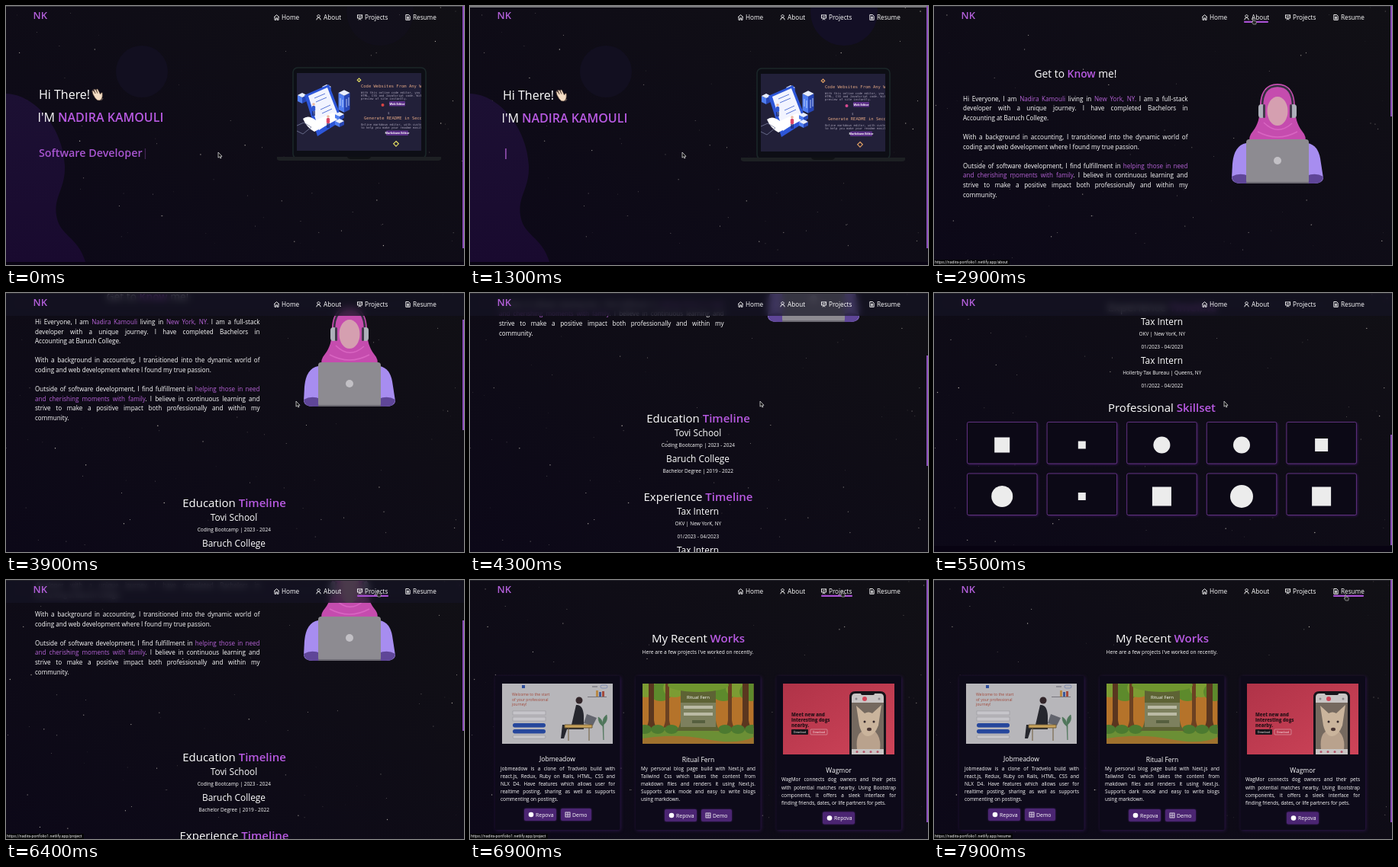
Animation of 600 by 340 pixels, one loop 8000 ms. Source, as an HTML page with a canvas:

```html
<!DOCTYPE html>
<html lang="en">
<head>
<meta charset="utf-8">
<title>Portfolio</title>
<style>
html, body { margin: 0; width: 600px; height: 340px; overflow: hidden; background: #0c0a14; }
#stage { position: relative; width: 600px; height: 340px; overflow: hidden; color: #fff;
  font-family: "Open Sans", "Noto Sans", sans-serif; font-weight: 500;
  background: linear-gradient(to bottom left, #111015, #0c0818); }
#stage > *, .page > * { position: absolute; left: 0; top: 0; }
svg { overflow: visible; display: block; }
.page { width: 600px; height: 340px; }
.row { position: absolute; white-space: nowrap; }
.full { text-align-last: justify; }
b { color: #b562d6; font-weight: inherit; }
.strong { fill: #b85ae2; font-weight: 600; }
#typed { left: 43px; top: 183px; font-size: 14.3px; line-height: 20px; font-weight: 600;
  color: #a855d0; white-space: pre; }
#caret { color: #b562d6; }
#bar { width: 600px; height: 30px; background: rgba(21, 20, 36, .72); backdrop-filter: blur(5px); }
#thumb { left: 598px !important; width: 2px; background: #8c4fbd; }
#link { top: 333px !important; height: 7px; padding: 0 2px 0 1px; background: #050507; color: #eee;
  font: 5.2px/7px Roboto, sans-serif; white-space: nowrap; }
#edge { width: 600px; }
.foot { width: 600px; background: #080312; }
</style>
</head>
<body>
<div id="stage">
  <canvas id="sky" width="600" height="340"></canvas>
  <div id="home" class="page"></div>
  <div id="about" class="page"></div>
  <div id="works" class="page"></div>
  <div id="bar"></div>
  <svg id="nav" width="600" height="30"></svg>
  <div id="edge"></div>
  <div id="thumb"></div>
  <div id="link"></div>
  <svg id="mouse" width="12" height="14"></svg>
</div>
<script>
const LOOP = 8000, STEP = 100;
const $ = id => document.getElementById(id);

// ---------- drawing helpers ----------
const svg = (body, h = 340) => `<svg width="600" height="${h}">${body}</svg>`;
const text = (x, y, size, str, attrs = 'fill="#fff"') =>
  `<text x="${x}" y="${y}" font-size="${size}" ${attrs}>${str}</text>`;
const mid = (x, y, size, str, attrs = '') =>
  text(x, y, size, str, `fill="#fff" text-anchor="middle" ${attrs}`);
const rect = (x, y, w, h, fill, attrs = '') =>
  `<rect x="${x}" y="${y}" width="${w}" height="${h}" fill="${fill}" ${attrs}/>`;
const disc = (x, y, r, fill) => `<circle cx="${x}" cy="${y}" r="${r}" fill="${fill}"/>`;
const oval = (x, y, rx, ry, fill) => `<ellipse cx="${x}" cy="${y}" rx="${rx}" ry="${ry}" fill="${fill}"/>`;
const poly = (pts, fill, attrs = '') => `<polygon points="${pts}" fill="${fill}" ${attrs}/>`;
const path = (d, fill, attrs = '') => `<path d="${d}" fill="${fill}" ${attrs}/>`;
const accent = str => `<tspan class="strong">${str}</tspan>`;

// Justified rows; y is the middle of the first row.
const rows = (x, y, w, size, gap, lines) => lines.map((line, i) =>
  `<div class="row ${i < lines.length - 1 ? 'full' : ''}" style="left:${x}px;top:${y + i * gap - gap / 2}px;` +
  `width:${w}px;font-size:${size}px;line-height:${gap}px">${line}</div>`).join('');

// Isometric block: x, y is the centre of the top face.
const block = (x, y, w, h) => {
  const d = w / 2;
  return poly(`${x - w},${y} ${x},${y + d} ${x},${y + d + h} ${x - w},${y + h}`, '#4f7df0') +
    poly(`${x + w},${y} ${x},${y + d} ${x},${y + d + h} ${x + w},${y + h}`, '#2746b5') +
    poly(`${x - w},${y} ${x},${y - d} ${x + w},${y} ${x},${y + d}`, '#e8eeff');
};
const person = (x, y, shirt) => disc(x, y - 7, 1.8, '#e8b8a0') +
  rect(x - 2.2, y - 5, 4.4, 7, shirt, 'rx="1.5"') + rect(x - 1.7, y + 2, 1.4, 6, '#1c2a70') + rect(x + .4, y + 2, 1.4, 6, '#1c2a70');

// ---------- home ----------
function laptop() {
  const mono = 'fill="#e0a583" font-family="DejaVu Sans Mono, monospace"';
  const tiny = 'fill="#a9a3b8" font-family="DejaVu Sans Mono, monospace"';
  const tag = (x, y, w, label) => rect(x, y, w, 6.5, '#5b2f87', 'rx="1"') +
    mid(x + w / 2, y + 4.6, 3.7, label, 'font-weight="700"');
  const scene =
    block(420, 106, 6, 4) + block(388, 117, 6, 8) +
    poly('391,117 423,103 441,150 408,171', '#2d56d8') +
    poly('396,118 421,107 436,146 410,163', '#f2f4ff') +
    path('M389 148Q396 142 406 150L428 140Q436 142 434 149L404 165Q394 160 389 148Z', '#fff') +
    path('M404 121l14-6M406 126l14-6M412 136l13-6M414 141l13-6', 'none', 'stroke="#5a77d8"') +
    block(443, 114, 7.5, 22) + path('M438 121v10M441 123v10M446 122v11M449 120v11', 'none', 'stroke="#dbe5ff" stroke-width=".8"') +
    block(437, 142, 6, 5) + block(437, 151, 6, 5) +
    person(403, 136, '#3157cf') + person(422, 152, '#d94668') +
    path('M379 158l11-5 10 6-11 9-10-5z', 'none', 'stroke="#777b9b" stroke-width=".8"');
  return rect(376, 81, 174, 119, '#0d0e15', 'rx="6" stroke="#1b2729" stroke-width="1.6"') +
    rect(381, 88, 163, 102, '#222039') +
    `<g clip-path="url(#screen)">${scene}` +
    text(465, 107, 5.5, 'Code Websites From Any Where', mono) +
    ['With this online code editor, you can', 'HTML, CSS and JavaScript code. With', 'preview of site instantly.']
      .map((s, i) => text(465, 115 + i * 4.2, 3.9, s, tiny)).join('') +
    tag(502, 125, 21, 'Web Editor') + text(500, 142, 4, '$', tiny) +
    text(469, 149, 5.5, 'Generate README in Seconds', mono) +
    ['Online markdown editor, with custom', 'to help you make your readme easily.']
      .map((s, i) => text(465, 157 + i * 4.2, 3.9, s, tiny)).join('') +
    tag(498, 163.5, 29, 'Markdown Editor') +
    `<g id="gems" fill="none" stroke-width="1.2"><path d="M462.5 95l2.2 2.2-2.2 2.2-2.2-2.2z"/><path d="M511 177.5l3.3 3.3-3.3 3.3-3.3-3.3z"/></g>` +
    `<circle id="dot" cx="493.5" cy="130" r="2"/></g>` +
    path('M355 198H570V201Q569 203 565 203H360Q356 203 355 201Z', '#1d2023') +
    path('M447 198h31q-1 3-5 3h-21q-4 0-5-3z', '#101215');
}
const hand = `<g id="wave" fill="#f4ddc4" stroke="#5d4637" stroke-width=".6">
  <path d="M114 116l-1-4q1-1.5 2.2 0l2 3-2-5q1-1.5 2.3 0l2.5 4.5-1.6-4.8q1.2-1.3 2.2 .2l3 6q.8-3 2.6-2 .5 6-1.2 8.5-2.5 2.5-5.5 1-3-2-5.5-7.4z"/>
  <path d="M115 109.5q-2 1-2.2 3M127 121q-.5 2-2.5 2.8" fill="none" stroke="#a88f80"/></g>`;
$('home').innerHTML = `<div class="foot" style="top:336px;height:4px"></div>` + svg(`
  <defs>
    <clipPath id="screen"><rect x="381" y="88" width="163" height="102"/></clipPath>
    <linearGradient id="blob" x1="0" y1="0" x2="0" y2="1"><stop offset="0" stop-color="#1c1033"/><stop offset="1" stop-color="#190a2f"/></linearGradient>
  </defs>
  ${path('M0 115C38 116 75 160 77 210C78 240 62 250 66 275C70 302 94 302 104 336H0Z', 'url(#blob)')}
  ${disc(178, 86, 34, '#120f20')}
  <circle id="moon" cx="490" cy="8" r="44" fill="#15102a"/>
  <g id="hero">
    ${text(43, 122, 16, 'Hi There!')}${hand}
    ${text(41.5, 152, 16, 'I\'M')}
    ${text(68, 152, 16, 'NADIRA KAMOULI', 'class="strong"')}
    ${laptop()}
  </g>`) + `<div id="typed"><span id="word"></span><span id="caret">|</span></div>`;

// ---------- about ----------
const woman = `
  ${path('M409 180Q393 183 391 207L390 226Q391 233 402 233H498Q509 233 510 226L506 200Q503 183 490 180Z', '#a78df0')}
  ${path('M390 224Q400 218 412 223V233H402Q391 233 390 224ZM510 224Q500 218 488 223V233H498Q509 233 510 224Z', '#5f4698')}
  ${path('M450 102C435 102 427 113 427 132C427 147 424 156 418 164Q411 172 414 180H486Q489 172 482 164C476 156 473 147 473 132C473 113 465 102 450 102Z', '#c54cae')}
  ${path('M434 110q16-9 32 0M424 165q26 14 52 0M432 153q18 18 37 1', 'none', 'stroke="#d965c2" stroke-width="1.5"')}
  ${oval(450, 138, 13.5, 19, '#d59fb0')}
  ${path('M430 132Q430 105 450 105T470 132', 'none', 'stroke="#353040" stroke-width="2.6"')}
  ${rect(425, 129, 8, 18, '#aeb0ba', 'rx="4"')}${rect(467, 129, 8, 18, '#aeb0ba', 'rx="4"')}
  ${rect(431, 129, 3, 18, '#40394a', 'rx="1.5"')}${rect(466, 129, 3, 18, '#40394a', 'rx="1.5"')}
  ${rect(409, 175, 82, 58, '#8d8b91', 'rx="4"')}${rect(409, 231, 82, 2, '#6c6a72', 'rx="1"')}
  ${disc(450, 203, 5, '#c2c0c5')}`;
const entry = (y, title, ...notes) => mid(298.5, y + 4, 11.9, title) +
  notes.map((s, i) => mid(298.8, y + 17.7 + i * 17, 6.5, s)).join('');
// s = square, c = circle, followed by its size
const marks = ['s20', 's10', 'c11', 'c11', 's17', 'c14', 's10', 's25', 'c15', 's25'];
const skills = marks.map((m, i) => {
  const x = 43.5 + (i % 5) * 104.6, y = 613.5 + Math.floor(i / 5) * 67.5, n = +m.slice(1);
  const cx = x + 45.7, cy = y + 30;
  return rect(x, y, 91.5, 54.5, '#0c0916', 'rx="2" stroke="#743d97" stroke-width=".8" style="filter:drop-shadow(1px 1px 1.5px #331650)"') +
    (m[0] === 'c' ? disc(cx, cy, n, '#ececec') : rect(cx - n / 2, cy - n / 2, n, n, '#ececec'));
}).join('');
$('about').innerHTML = `<div class="foot" style="top:776px;height:8px"></div>` + svg(`
  ${mid(185.5, 93.5, 13.8, `Get to ${accent('Know')} me!`)}
  ${woman}
  ${mid(299, 365, 15, `Education ${accent('Timeline')}`)}
  ${entry(379, 'Tovi School', 'Coding Bootcamp | 2023 - 2024')}
  ${entry(413, 'Baruch College', 'Bachelor Degree | 2019 - 2022')}
  ${mid(299, 468, 15, `Experience ${accent('Timeline')}`)}
  ${entry(482, 'Tax Intern', 'OKV | New YorK, NY', '01/2023 - 04/2023')}
  ${entry(533, 'Tax Intern', 'Hollerby Tax Bureau | Queens, NY', '01/2022 - 04/2022')}
  ${mid(298.5, 600, 15, `Professional ${accent('Skillset')}`)}
  ${skills}`, 790) +
  rows(38, 122, 294.5, 8.1, 12.6, ['Hi Everyone, I am <b>Nadira Kamouli</b> living in <b>New York, NY.</b> I am a full-stack',
    'developer with a unique journey. I have completed Bachelors in', 'Accounting at Baruch College.']) +
  rows(38, 172.3, 294.5, 8.1, 12.6, ['With a background in accounting, I transitioned into the dynamic world of',
    'coding and web development where I found my true passion.']) +
  rows(38, 210, 294.5, 8.1, 12.6, ['Outside of software development, I find fulfillment in <b>helping those in need</b>',
    '<b>and cherishing moments with family</b>. I believe in continuous learning and',
    'strive to make a positive impact both professionally and within my', 'community.']);

// ---------- works ----------
const reader = rect(120, 153, 25, 1, '#77757c') + rect(123, 146, 3, 7, '#a34a3c') + rect(127, 147, 3, 6, '#3d5899') + rect(131, 145, 3, 8, '#b88947') +
  path('M150 178Q151 163 160 164L166 190H178L180 208H176L172 196H150Z', '#25262d') + disc(156, 158, 4.5, '#33262a') +
  poly('133,181 146,176 150,188 138,191', '#62646d') + path('M139 190h36v4h-36zM143 194v17M170 194v17', '#c8a35b', 'stroke="#6e5b38"') +
  path('M124 210v-20q-6-5-4-13 6 4 5 13 1-8 6-10 0 8-6 12z', '#4f765b', 'stroke="#4f765b" stroke-width=".7"');
const jobsArt = rect(42, 136, 145, 79, '#b7b6ba') + rect(68, 138, 4, 4, '#2f4f9c') +
  rect(160, 139, 7, 2, '#8e8d94') + rect(171, 138, 9, 4, 'none', 'stroke="#4a64a8" stroke-width=".5" rx="2"') +
  ['Welcome to the start', 'of your professional', 'journey!'].map((s, i) => text(55, 152 + i * 6.5, 5.1, s, 'fill="#a34a3c"')).join('') +
  [172, 180].map(y => rect(56, y, 43, 5, '#c6c5ca', 'stroke="#85848c" stroke-width=".4"')).join('') +
  [188, 196].map(y => rect(56, y, 43, 5.5, '#26479c', 'rx="2.7"')).join('') +
  rect(56, 204, 43, 4, '#c8c7cb', 'rx="2" stroke="#85848c" stroke-width=".4"') +
  `<g transform="translate(299 0) scale(-1 1)">${reader}</g>`;

const trunk = (x, w, fill) => path(`M${x} 136h${w}v48q1 9 6 14h${-w - 12}q5-5 6-14z`, fill);
const forestArt = `<g clip-path="url(#forest)">` + rect(226, 136, 146, 79, '#b5732a') +
  [230, 250, 268, 332, 350, 368].map((x, i) => oval(x, 142 + i % 2 * 5, 15, 12, i % 2 ? '#5d8a2c' : '#7c9c33')).join('') +
  trunk(234, 7, '#5a361f') + trunk(256, 5, '#6b4122') + trunk(338, 5, '#6b4122') + trunk(357, 8, '#5a361f') +
  path('M226 198Q260 190 299 196T372 194V215H226Z', '#6b8f35') + path('M226 208Q270 201 310 209T372 206V215H226Z', '#a0722e') +
  [229, 246, 264, 334, 351, 369].map(x => oval(x, 196, 9, 6, '#4c7a30')).join('') +
  trunk(276, 46, '#5d6234') + oval(299, 138, 40, 9, '#6f962f') +
  mid(299, 156, 6, 'Ritual Fern') + rect(276, 161, 46, 32, '#85876a', 'opacity=".8"') +
  [165, 174].map(y => rect(280, y, 38, 4, '#babaa4')).join('') + rect(291, 184, 17, 4, '#565f3f') + '</g>';

const dogArt = rect(410, 136, 146, 93, 'url(#rose)') +
  ['Meet new and', 'interesting dogs', 'nearby.'].map((s, i) => text(421, 179 + i * 7, 6, s, 'fill="#2a1118" font-weight="800"')).join('') +
  rect(421, 196, 22, 7, '#17151a', 'rx="1"') + mid(432, 201, 3.4, 'Download') +
  rect(446, 196, 22, 7, 'none', 'rx="1" stroke="#e6c6cb" stroke-width=".5"') + mid(457, 201, 3.4, 'Download') +
  path('M497 229V154Q497 146 505 146H537Q545 146 545 154V229Z', '#16141a') +
  path('M500 229V154Q500 149 505 149H537Q542 149 542 154V229Z', '#c9c5c4') + rect(512, 147, 18, 4, '#16141a', 'rx="2"') +
  disc(517, 156, 3, '#d34358') + disc(506, 156, 1.5, '#8d888d') + disc(536, 156, 1.5, '#8d888d') +
  rect(500, 161, 42, 61, '#75695f') + path('M507 222Q505 204 513 199H531Q539 208 537 222Z', '#b9a28d') +
  path('M506 165L517 175Q522 172 527 175L539 164 535 191Q530 204 522 205T510 191Z', '#cab49c') +
  disc(517, 186, 1.5, '#33272a') + disc(529, 186, 1.5, '#33272a') + oval(523, 196, 3, 2.2, '#4a3634') +
  [507, 516, 525, 534].map(x => disc(x, 225.5, 1.5, '#b4566a')).join('');

const button = (x, y, w, label, round) => rect(x, y, w, 16, '#4b2572', 'rx="2" style="filter:drop-shadow(0 0 1px #43206a)"') +
  (round ? disc(x + 9, y + 8, 3.3, '#fff') : rect(x + 6, y + 5, 6, 6, 'none', 'stroke="#fff" stroke-width=".8"') +
    path(`M${x + 9} ${y + 5}v6M${x + 6} ${y + 8}h6`, 'none', 'stroke="#fff" stroke-width=".7"')) +
  text(x + 15, y + 10.7, 6.9, label);
const card = x => rect(x, 126, 163.5, 202, '#0d0a19', 'rx="2" style="filter:drop-shadow(1px 1px 2px #2c1549)"');
$('works').innerHTML = svg(`
  <defs>
    <linearGradient id="rose" x1="0" x2="1" y2="1"><stop stop-color="#b03348"/><stop offset="1" stop-color="#ce4459"/></linearGradient>
    <clipPath id="forest"><rect x="226" y="136" width="145.5" height="79"/></clipPath>
  </defs>
  ${mid(299, 82, 15, `My Recent ${accent('Works')}`)}
  ${mid(298.5, 97, 6.65, 'Here are a few projects I\'ve worked on recently.')}
  ${card(33)}${card(217)}${card(401.5)}
  ${jobsArt}${forestArt}${dogArt}
  ${mid(114.5, 238, 8.5, 'Jobmeadow')}${mid(299, 238.5, 8.5, 'Ritual Fern')}${mid(483, 252.5, 8.5, 'Wagmor')}
  ${button(71, 300, 42, 'Repova', true)}${button(119, 300, 40, 'Demo')}
  ${button(255, 301, 42, 'Repova', true)}${button(303, 301, 40, 'Demo')}
  ${button(462, 304.5, 42, 'Repova', true)}`) +
  rows(40, 248, 150, 6.4, 10.1, ['Jobmeadow is a clone of Tradvelo build with', 'react.js, Redux, Ruby on Rails, HTML, CSS and',
    'NLX D4. Have features which allows user for', 'realtime posting, sharing as well as supports', 'commenting on postings.']) +
  rows(224, 248, 150, 6.4, 10.1, ['My personal blog page build with Next.js and', 'Tailwind Css which takes the content from',
    'makdown files and renders it using Next.js.', 'Supports dark mode and easy to write blogs', 'using markdown.']) +
  rows(408, 262.5, 150, 6.4, 10.1, ['WagMor connects dog owners and their pets', 'with potential matches nearby. Using Bootstrap',
    'components, it offers a sleek interface for', 'finding friends, dates, or life partners for pets.']);

// ---------- navigation ----------
const links = [
  { name: 'Home', x: 351, end: 384, url: '', icon: 'M0 3.5L3.5 .3 7 3.5M1 3v4h1.8V4.5h1.5V7H6V3' },
  { name: 'About', x: 406, end: 438, url: 'about', icon: 'M3.5 .3a1.7 1.7 0 1 1-.01 0M.8 7Q1 4 3.5 4T6.2 7' },
  { name: 'Projects', x: 460, end: 501, url: 'project', icon: 'M0 .6h7M.5 .6v4.2h6V.6M3.5 5v1M1.8 7l1.7-1.5L5.2 7M1.8 3.5l1.3-1.2 1 .8L5.5 1.8' },
  { name: 'Resume', x: 523, end: 563, url: 'resume', icon: 'M.8 .2h3.7l1.7 1.7V7H.8zM2 2.8h3M2 4.2h3M2 5.6h3' },
];
$('nav').innerHTML = text(35.5, 17.3, 13, 'NK', 'fill="#b25fd9" font-weight="600"') + links.map((l, i) =>
  path(l.icon, 'none', `transform="translate(${l.x} 11.3)" stroke="#fff" stroke-width=".9"`) +
  text(l.x + 10, 17.6, 8.2, l.name) + rect(l.x, 19.7, 0, 2.2, '#a850d2', `id="line${i}" rx="1"`)).join('');

const arrow = path('M0 0V7.2L1.7 5.7 2.8 8 4 7.5 3 5.3H5Z', '#111', 'stroke="#eee" stroke-width=".7"');
const pointer = path('M1.5 .5Q2.6 0 2.8 1V3.2L5.5 3.8Q6.5 4.2 6.3 5.5L5.7 8H2.2L.3 5.2Q0 4.2 1.5 5Z', '#222', 'stroke="#ccc" stroke-width=".6"');

// ---------- motion ----------
const mousePath = [[0, 278, 192], [1700, 278, 192], [2400, 416, 16], [3000, 416, 16], [3500, 380, 142],
  [5500, 380, 142], [6200, 485, 14], [6900, 485, 14], [7500, 537, 19], [8000, 537, 19]];
const scrollPath = [[0, 0], [3600, 0], [4300, 195], [5000, 444], [5500, 444], [6200, 127], [8000, 127]];
const waveTurns = [[0, 0], [210, 14], [420, -8], [630, 14], [840, -4], [1050, 10], [1260, 0], [2100, 0]];
const TO_ABOUT = 2600, TO_WORKS = 6700;

function along(keys, t, col = 1) {
  const i = Math.max(1, keys.findIndex(k => k[0] >= t));
  const a = keys[i - 1], b = keys[i];
  return a[col] + (b[col] - a[col]) * (t - a[0]) / (b[0] - a[0]);
}
function typedWord(t) {
  if (t < 1300) return 'Software Developer'.slice(0, Math.max(0, 18 - Math.max(0, Math.floor((t - 100) / 55))));
  return 'Full Stack Developer'.slice(0, Math.floor((t - 1300) / 80));
}

let seed = 41;
const rnd = () => (seed = seed * 16807 % 2147483647) / 2147483647;
const stars = Array.from({ length: 88 }, () => ({ x: rnd() * 598, y: rnd() * 332, r: .35 + rnd() * .4, phase: rnd() * 6.3, rate: .5 + rnd() * 1.2 }));
const ctx = $('sky').getContext('2d');
function drawSky(t) {
  ctx.clearRect(0, 0, 600, 340);
  ctx.fillStyle = '#e6dfd2';
  for (const s of stars) {
    ctx.globalAlpha = .42 + .36 * Math.sin(s.phase + s.rate * t / 1000);
    ctx.beginPath();
    ctx.arc((s.x + t * .0008) % 600, s.y, s.r, 0, 7);
    ctx.fill();
  }
}

function drawHome(t) {
  const late = t >= 700;
  $('hero').setAttribute('transform', `translate(0 ${late ? 1 : 0})`);
  $('moon').setAttribute('opacity', late ? .8 : .25);
  $('wave').setAttribute('transform', `rotate(${along(waveTurns, t % 2100)} 124 122)`);
  $('gems').setAttribute('stroke', late ? '#e0a064' : '#e2dc62');
  $('dot').setAttribute('fill', late ? '#d84a90' : '#d94444');
  $('word').textContent = typedWord(t);
  $('caret').style.opacity = .65 + .35 * Math.cos((t - 1300) / 138);
}

function draw(t) {
  const page = t < TO_ABOUT ? 'home' : t < TO_WORKS ? 'about' : 'works';
  for (const id of ['home', 'about', 'works']) $(id).style.display = id === page ? '' : 'none';
  drawSky(t);
  if (page === 'home') drawHome(t);

  const scroll = page === 'about' ? along(scrollPath, t) : 0;
  $('about').style.top = -scroll + 'px';
  $('bar').style.display = scroll > 8 ? '' : 'none';
  $('thumb').style.top = scroll * .42 + 'px';
  $('thumb').style.height = (page === 'about' ? 145 : 318) + 'px';
  const bright = page === 'home' && t >= 700;
  $('edge').style.cssText = `height:${bright ? 2 : 1}px;background:${bright ? '#77777a' : page === 'home' ? '#3c3c42' : '#24232b'}`;

  const mx = along(mousePath, t, 1), my = along(mousePath, t, 2);
  const over = my < 24 ? links.findIndex(l => mx >= l.x && mx <= l.end) : -1;
  links.forEach((l, i) => $('line' + i).setAttribute('width', i === over ? l.end - l.x : 0));
  $('mouse').innerHTML = over < 0 ? arrow : pointer;
  $('mouse').style.transform = `translate(${mx}px, ${my}px)`;
  $('link').style.display = over < 0 ? 'none' : '';
  if (over >= 0) $('link').textContent = 'https://nadira-portfolio1.netlify.app/' + links[over].url;
}

const begin = performance.now();
function tick() {
  const t = (performance.now() - begin) % LOOP;
  draw(Math.floor(t / STEP) * STEP);
  requestAnimationFrame(tick);
}
tick();
</script>
</body>
</html>
```
